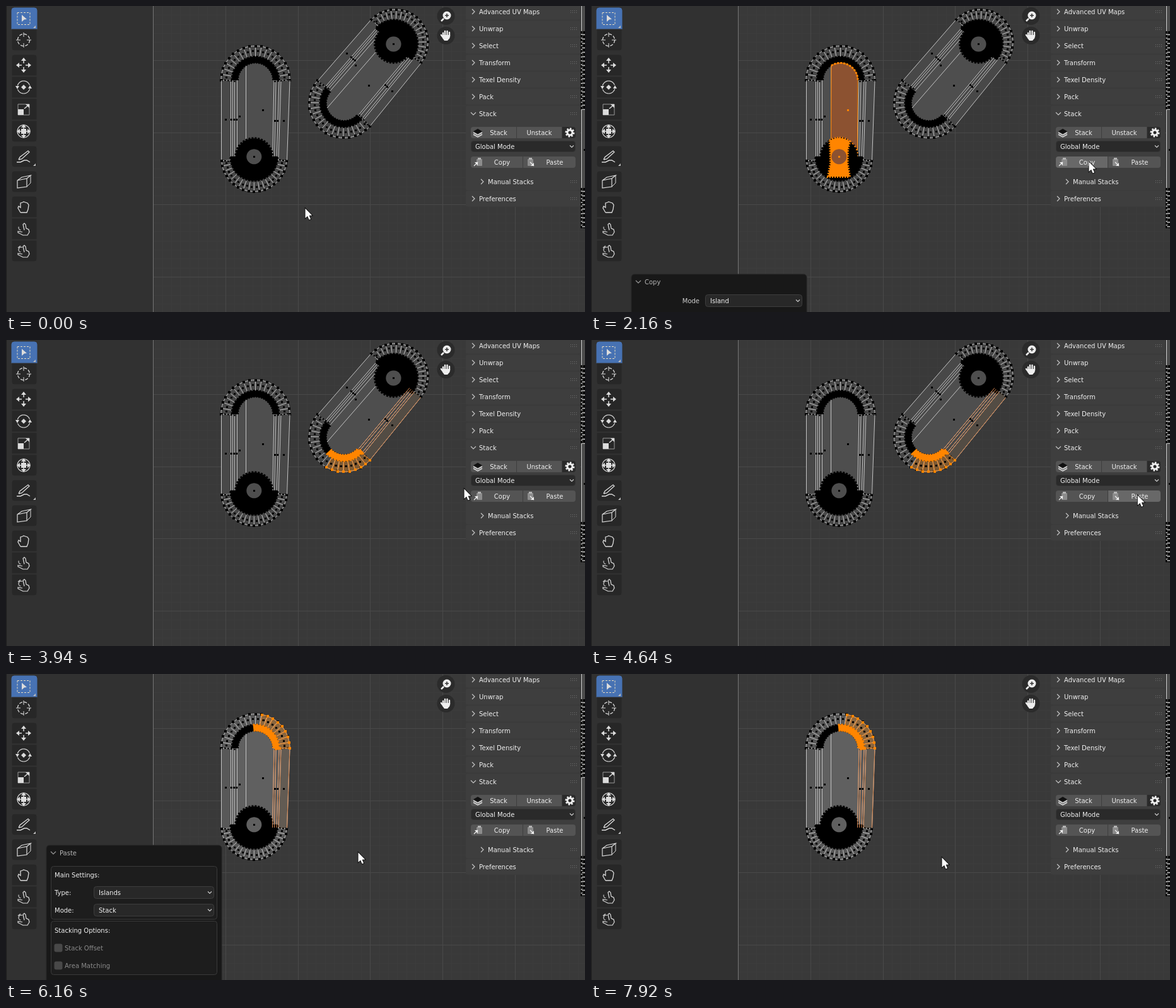
An HTML page with a canvas for the animation above (7990 ms loop, 918 by 486 pixels).

```html
<!DOCTYPE html>
<html lang="en">
<head>
<meta charset="utf-8">
<title>UV stack copy and paste</title>
<style>
html, body { margin: 0; width: 918px; height: 486px; overflow: hidden; background: #393939; }
canvas { display: block; }
</style>
</head>
<body>
<canvas id="stage" width="918" height="486"></canvas>
<script>
const g = document.getElementById('stage').getContext('2d');
const LOOP = 7990, ORANGE = '#ff8500', TAU = Math.PI * 2, RAD = Math.PI / 180;

// cursor tip: time, x, y
const PATH = [
  [0, 474, 321], [70, 474, 321], [420, 402, 232], [620, 398, 226], [830, 384, 288],
  [900, 382, 290], [970, 384, 291], [1120, 384, 291], [1170, 389, 290], [1500, 560, 277],
  [1940, 789, 247], [2490, 789, 247], [2800, 630, 270], [3050, 513, 190], [3240, 545, 150],
  [3380, 556, 162], [3600, 572, 185], [3940, 726, 236], [4080, 808, 244], [4500, 866, 246],
  [4920, 867, 247], [5060, 868, 248], [5320, 868, 248], [5780, 416, 274], [6160, 558, 283],
  [6380, 538, 285], [6640, 555, 284], [6840, 555, 284], [7190, 455, 288], [7590, 554, 286],
  [7920, 556, 291], [LOOP, 556, 291]
];
const EVENTS = { pick: 450, copyPress: 2020, copy: 2090, pickOther: 3380, pastePress: 4700, paste: 4780, grab: 6860, drop: 7700 };

function cursorAt(t) {
  let i = 1;
  while (i < PATH.length - 1 && PATH[i][0] < t) i++;
  const [t0, x0, y0] = PATH[i - 1], [t1, x1, y1] = PATH[i];
  const k = Math.min(1, (t - t0) / (t1 - t0)), e = k * k * (3 - 2 * k);
  return [x0 + (x1 - x0) * e, y0 + (y1 - y0) * e];
}

// ---- basic drawing ----
function trace(pts, close) {
  g.beginPath();
  pts.forEach(([x, y], i) => i ? g.lineTo(x, y) : g.moveTo(x, y));
  if (close) g.closePath();
}
function fill(pts, color) { trace(pts, true); g.fillStyle = color; g.fill(); }
function line(pts, color, width = 1, dash = []) {
  trace(pts);
  g.setLineDash(dash);
  g.strokeStyle = color;
  g.lineWidth = width;
  g.stroke();
  g.setLineDash([]);
}
function box(x, y, w, h, color, r = 0, border) {
  g.beginPath();
  g.roundRect(x, y, w, h, r);
  g.fillStyle = color;
  g.fill();
  if (border) { g.strokeStyle = border; g.lineWidth = 1; g.stroke(); }
}
function disc(x, y, r, color) {
  g.beginPath();
  g.arc(x, y, r, 0, TAU);
  g.fillStyle = color;
  g.fill();
}
function text(s, x, y, color = '#f0f0f0', align = 'left') {
  g.font = '10px "DejaVu Sans", sans-serif';
  g.textAlign = align;
  g.fillStyle = color;
  g.fillText(s, x, y + 4);
}
function chevron(x, y, down, color = '#c4c4c4', s = 4) {
  line(down ? [[x - s, y - s / 2], [x, y + s / 2], [x + s, y - s / 2]]
            : [[x - s / 2, y - s], [x + s / 2, y], [x - s / 2, y + s]], color, 1.2);
}
function arc(cx, cy, r, a0, a1, n = 40) {
  return Array.from({ length: n + 1 }, (_, i) => {
    const a = (a0 + (a1 - a0) * i / n) * RAD;
    return [cx + r * Math.cos(a), cy + r * Math.sin(a)];
  });
}

// ---- UV islands, all built in the space of the upright one ----
const TOP = [395.5, 118], LOW = [393.3, 243], HUB = [393.3, 239.3];
const LEFT = [341.5, 356.5, 359.5, 362.5, 366.5];
const RIGHT = [[450, 445.5], [436, 432], [433, 429], [428, 425.5], [425, 422.5]];
const MARKS = [[348, 180], [357, 180], [361, 180], [365, 180], [370, 175], [407, 165], [426, 182], [430, 182], [440, 182]];

const upright = p => p;
function tilted([x, y]) {
  const dx = (393 - x) * 1.01, dy = (y - 239) * 1.01, c = Math.cos(221 * RAD), s = Math.sin(221 * RAD);
  return [614 + dx * c - dy * s, 60.5 + dx * s + dy * c];
}

function pen(map) {
  const m = pts => pts.map(map);
  return {
    fill: (pts, c) => fill(m(pts), c),
    line: (pts, c, w, d) => line(m(pts), c, w, d),
    dots(pts, c, s = 3) {
      g.fillStyle = c;
      m(pts).forEach(([x, y]) => g.fillRect(Math.round(x - s / 2), Math.round(y - s / 2), s, s));
    }
  };
}

function ring(p, [cx, cy], r0, r1, a0, a1, n, lineColor, dotColor) {
  const inner = arc(cx, cy, r0, a0, a1, n), outer = arc(cx, cy, r1, a0, a1, n);
  const half = (a1 - a0) / n / 2;
  p.line(arc(cx, cy, r1, a0, a1), lineColor);
  inner.forEach((q, i) => p.line([q, outer[i]], lineColor));
  p.dots(arc(cx, cy, (r0 + r1) / 2, a0 + half, a1 - half, n - 1), '#000');
  p.dots(outer, dotColor, 4);
}
function band(p, [cx, cy], r0, r1, a0, a1, color) {
  p.fill([...arc(cx, cy, r0, a0, a1), ...arc(cx, cy, r1, a1, a0)], color);
  p.line(arc(cx, cy, r0, a0, a1), color, 2, [2, 2]);
  p.line(arc(cx, cy, r1, a0, a1), color, 3, [3, 2]);
}

function island(map, { face, stacked, quarter }) {
  const p = pen(map), body = stacked ? '#606060' : '#4e4e4e', wire = '#c4c4c4';
  p.fill([...arc(...TOP, 54.5, 180, 360), ...arc(...LOW, 52, 3, 177)], stacked ? '#585858' : '#484848');
  p.fill([...arc(...TOP, 29, 180, 360), [422, 243], [366, 243]], body);
  ring(p, TOP, 38, 54.5, 180, 360, 18, wire, '#000');
  ring(p, LOW, 37, 51.5, 3, 177, 18, wire, '#000');
  LEFT.forEach(x => p.line([[x, 118], [x, 245]], wire));
  RIGHT.forEach(([a, b]) => p.line([[a, 118], [b, 245]], wire));
  p.line([[380.5, 93], [380.5, 215]], wire);
  p.line([[341, 117], [366, 120]], '#000', 2, [3, 2]);
  p.line([[425, 120], [450, 117]], '#000', 2, [3, 2]);
  p.line([[341, 245], [364, 248]], '#000', 2, [3, 2]);
  p.line([[423, 243], [446, 246]], '#000', 2, [3, 2]);
  band(p, TOP, 27.5, 37.5, 180, 360, '#000');

  if (face) {
    const shape = [...arc(...TOP, 27.5, 238, 358), [422.5, 242], [380.5, 242]];
    p.fill(shape, '#8c5231');
    p.line([...shape, shape[0]], ORANGE);
    p.line(arc(...TOP, 27.5, 238, 358), ORANGE, 3, [3, 2]);
  }
  p.fill(arc(...HUB, 29, 0, 360, 60), '#000');
  p.line(arc(...HUB, 29.5, 0, 360, 60), '#000', 3, [3, 2]);
  p.fill(arc(393.3, 240, 37.5, -2, 182), '#000');
  p.line(arc(393.3, 240, 37.5, 0, 180), '#000', 3, [3, 2]);
  if (face) {
    const blob = [...arc(...HUB, 29.5, 240, 305, 12), [407, 228], [406.5, 250], [410, 271], [376, 271], [380, 250], [379.5, 228]];
    p.fill(blob, ORANGE);
    p.line([...blob, blob[0]], ORANGE, 4, [2, 2]);
    p.line(arc(...HUB, 30, 302, 350), ORANGE, 2, [2, 4]);
  }
  p.fill(arc(...HUB, 12, 0, 360), face ? '#8c5231' : body);
  p.dots(MARKS, '#000');
  p.dots([HUB], face ? ORANGE : '#000');
  if (face) p.dots([[407, 165]], ORANGE);
  if (quarter) selectedPart(map);
}

function selectedPart(map) {
  const p = pen(map);
  p.fill([...arc(...TOP, 38, -79, 0), ...arc(...TOP, 54, 0, -79)], 'rgba(255,133,0,.3)');
  p.fill([[436, 118], [450, 118], [445.5, 245], [432, 245]], 'rgba(255,133,0,.06)');
  RIGHT.forEach(([a, b]) => p.line([[a, 118], [b, 244]], '#d98850'));
  ring(p, TOP, 38, 54.5, -79, 0, 8, '#f08a2c', ORANGE);
  band(p, TOP, 27.5, 37.5, -96, 0, ORANGE);
  p.line([[426, 119], [436, 118]], ORANGE, 4);
  p.dots([[426, 182], [430, 182], [440, 182]], '#000');
}

// ---- editor background ----
function grid() {
  g.fillStyle = '#393939';
  g.fillRect(0, 0, 918, 486);
  const step = 114.7;
  const rules = (gap, n, color) => {
    g.fillStyle = color;
    for (let i = 0; i < n; i++) {
      g.fillRect(Math.round(233.3 + i * gap), 0, 1, 486);
      g.fillRect(234, Math.round(-28.8 + i * gap), 684, 1);
    }
  };
  rules(step / 8, 49, '#3c3c3c');
  rules(step, 6, '#494949');
  g.fillStyle = '#313131';
  g.fillRect(0, 0, 233, 486);
  g.fillStyle = '#1c1c1c';
  g.fillRect(0, 0, 1, 486);
  g.fillStyle = '#747474';
  g.fillRect(233, 0, 1, 486);
}

function edgeIsland() {
  g.fillStyle = '#4c4c4c';
  g.fillRect(913, 0, 5, 350);
  line([[912.5, 0], [912.5, 352]], '#cfcfcf');
  [[40, 166], [289, 353]].forEach(([a, b]) => {
    line([[912.5, a], [912.5, b]], '#000', 3, [4, 2]);
    line([[916.5, a], [916.5, b]], '#000', 3, [4, 3]);
    for (let y = a + 5; y < b; y += 7) line([[913, y + .5], [918, y + .5]], '#bbb');
  });
  g.fillStyle = '#000';
  g.fillRect(916, 227, 2, 3);
}

// ---- toolbar ----
function arrows(cx, cy, r0, r1, color) {
  for (let i = 0; i < 4; i++) {
    const c = [1, 0, -1, 0][i], s = [0, 1, 0, -1][i];
    const at = (u, v) => [cx + c * u - s * v, cy + s * u + c * v];
    line([at(r0, 0), at(r1 - 3, 0)], color, 1.5);
    fill([at(r1, 0), at(r1 - 5, -4), at(r1 - 5, 4)], color);
  }
}
function hand(x, y, c) {
  g.lineCap = 'round';
  [[-5, -3], [-2, -6], [1.5, -6], [5, -4]].forEach(([dx, dy]) => line([[x + dx, y + 2], [x + dx, y + dy]], c, 2.4));
  line([[x - 5, y + 4], [x - 8, y]], c, 2.4);
  g.lineCap = 'butt';
  fill([[x - 6, y], [x + 6.2, y], [x + 5.5, y + 5], [x + 2, y + 9], [x - 3, y + 9], [x - 6, y + 5]], c);
}
function finger(x, y, c, swirl) {
  line([[x + 1, y + 2], [x - 1, y - 7], [x + 1, y - 9], [x + 3, y - 7], [x + 4, y - 1], [x + 8, y + 1], [x + 9, y + 5], [x + 6, y + 10], [x - 1, y + 10], [x - 9, y + 6], [x - 9, y + 4], [x - 2, y + 5]], c, 1.2);
  line(arc(x - 4, y - 2, 4, 100, swirl ? 300 : 200), c, 1.1);
  if (swirl) line([[x - 9, y - 5], [x - 5, y - 8]], c, 1.1);
}
const ICONS = [
  (x, y, c) => {
    line([[x - 10, y - 9.5], [x + 10, y - 9.5], [x + 10, y + 9.5], [x - 10, y + 9.5], [x - 10, y - 9.5]], '#e8dcc0', 1, [3, 2]);
    fill([[x - 3, y - 6], [x + 5, y + 1], [x + 1, y + 1.5], [x - 3, y + 5]], c);
  },
  (x, y, c) => {
    line(arc(x, y, 9.5, 0, 360), c, 1.3, [5, 2.5]);
    for (let i = 0; i < 4; i++) {
      const a = i * 90 * RAD, u = Math.cos(a), v = Math.sin(a);
      line([[x + u * 5, y + v * 5], [x + u * 12, y + v * 12]], c);
    }
  },
  (x, y, c) => arrows(x, y, 3, 12, c),
  (x, y, c) => {
    line(arc(x, y, 10, 195, 340), c, 1.2);
    line(arc(x, y, 10, 15, 160), c, 1.2);
    fill([[x - 13, y - 2], [x - 7, y - 2], [x - 10, y + 3]], c);
    fill([[x + 13, y + 2], [x + 7, y + 2], [x + 10, y - 3]], c);
    fill([[x, y - 4], [x + 4, y], [x, y + 4], [x - 4, y]], c);
  },
  (x, y, c) => {
    line([[x - 9, y - 8], [x + 9, y - 8], [x + 9, y + 9], [x - 9, y + 9], [x - 9, y - 8]], '#999');
    box(x - 9, y, 9, 9, c);
    line([[x + 1, y - 1], [x + 7, y - 6]], c, 1.5);
    fill([[x + 9, y - 8], [x + 3, y - 8], [x + 9, y - 2]], c);
  },
  (x, y, c) => {
    line(arc(x, y, 10, 0, 360), c, 1.2);
    arrows(x, y, 4, 11, c);
    box(x - 4, y - 4, 8, 8, c);
  },
  (x, y, c) => {
    line([[x - 8, y + 5], [x - 6, y + 1], [x + 7, y - 9], [x + 9, y - 7], [x - 3, y + 4], [x - 8, y + 5]], c, 1.3);
    line([[x - 11, y + 9], [x - 5, y + 9], [x + 1, y + 6], [x + 5, y + 6], [x + 10, y + 9]], c, 1.4);
  },
  (x, y, c) => {
    line([[x - 10, y - 2], [x + 5, y - 5], [x + 5, y + 8], [x - 10, y + 10], [x - 10, y - 2], [x - 3, y - 7], [x + 11, y - 10], [x + 5, y - 5]], c, 1.2);
    line([[x + 11, y - 10], [x + 11, y + 2], [x + 5, y + 8]], c);
  },
  (x, y, c) => line([[x - 5, y + 9], [x - 9, y + 2], [x - 8, y - 1], [x - 5, y + 1], [x - 5, y - 6], [x - 2, y - 7], [x, y - 8], [x + 3, y - 7], [x + 6, y - 6], [x + 8, y - 3], [x + 7, y + 4], [x + 5, y + 9], [x - 5, y + 9]], c, 1.3),
  (x, y, c) => finger(x, y, c, false),
  (x, y, c) => finger(x, y, c, true)
];
const TOOL_Y = [3, 37, 77, 112, 147, 182, 222, 262, 302, 337, 372];
const JOIN = [2, 1, 2, 0, 0, 1, 3, 3, 2, 0, 1]; // 2 rounds the top, 1 the bottom

function toolbar() {
  TOOL_Y.forEach((y, i) => {
    const t = JOIN[i] & 2 ? 4 : 0, b = JOIN[i] & 1 ? 4 : 0;
    box(9, y, 40, 34, i ? '#272727' : '#4772b3', [t, t, b, b], i ? '#323232' : '#4772b3');
    ICONS[i](28, y + 17, '#dcdcdc');
    if (i === 0 || i === 6) fill([[47, y + 28], [47, y + 32], [43, y + 32]], '#bdbdbd');
  });
}

function gizmos() {
  disc(697.5, 16, 14, '#2b2b2b');
  disc(697.5, 47, 14, '#2b2b2b');
  disc(699, 15, 6.5, '#eee');
  line([[694, 20], [690, 24]], '#eee', 2.5);
  line([[696, 15], [702, 15]], '#333', 1.5);
  line([[699, 12], [699, 18]], '#333', 1.5);
  hand(698, 46, '#eee');
}

// ---- side panel ----
function grip(y) {
  g.fillStyle = '#707070';
  for (let i = 0; i < 4; i++) [-2, 1].forEach(d => g.fillRect(895 + i * 3, y + d, 1, 1));
}
function header(label, y, open) {
  box(729, y - 12.5, 181, 25, '#3e3e3e', 3);
  chevron(741, y, open);
  text(label, 750, y);
  grip(y);
}
function clipboard(x, y, out) {
  box(x - 3, y - 5, 9, 11, '#8c8c8c', 1);
  box(x - 1, y - 7, 5, 3, '#b5b5b5');
  const e = out ? [x - 1, y] : [x + 7, y + 6], s = out ? [x - 7, y + 6] : [x + 1, y];
  line([s, e], '#eee', 1.3);
  const d = out ? -1 : 1;
  fill([e, [e[0] - 5, e[1]], [e[0], e[1] - 5 * d]], '#eee');
}
function select(x, y, w, h, label) {
  box(x + .5, y + .5, w - 1, h - 1, '#282828', 4, '#3d3d3d');
  text(label, x + 8, y + h / 2);
  chevron(x + w - 7, y + h / 2, true, '#ccc', 3);
}

function sidePanel(t, [cx, cy]) {
  g.fillStyle = '#3a3a3a';
  g.fillRect(729, 0, 181, 319);
  ['Advanced UV Maps', 'Unwrap', 'Select', 'Transform', 'Texel Density', 'Pack'].forEach((s, i) => header(s, 9 + 27 * i));
  box(729, 158.5, 181, 134, '#3e3e3e', 3);
  header('Stack', 171, true);
  header('Preferences', 306);

  const tone = (x0, x1, y0, press) =>
    t >= press && t < press + 80 ? '#4772b3' :
    cx >= x0 && cx < x1 && cy >= y0 && cy < y0 + 19 ? '#686868' : '#545454';
  box(737, 192, 72, 18, '#545454', [4, 0, 0, 4]);
  box(810, 192, 71, 18, '#545454');
  box(882, 192, 21, 18, '#2a2a2a', [0, 4, 4, 0]);
  text('Stack', 781, 201, undefined, 'center');
  text('Unstack', 845.5, 201, undefined, 'center');
  [0, 3].forEach(d => line([[741, 201 + d], [748, 205 + d], [755, 201 + d]], '#ddd', 1.5));
  fill([[741, 199], [748, 195], [755, 199], [748, 203]], '#111');
  line(arc(894, 201, 6, 0, 360), '#eee', 3, [2.4, 2.3]);
  line(arc(894, 201, 4, 0, 360), '#eee', 3);

  box(737.5, 214.5, 165, 17, '#2a2a2a', 4, '#333');
  text('Global Mode', 744, 223);
  chevron(897, 223, true, '#ccc', 3);

  box(737, 239, 82, 18, tone(737, 819, 239, EVENTS.copyPress), [4, 0, 0, 4]);
  box(820, 239, 83, 18, tone(820, 903, 239, EVENTS.pastePress), [0, 4, 4, 0]);
  clipboard(749, 248, true);
  clipboard(830, 248, false);
  text('Copy', 786.5, 248, undefined, 'center');
  text('Paste', 870, 248, undefined, 'center');

  chevron(755, 279, false);
  text('Manual Stacks', 764, 279);
  grip(279);
}

// ---- operator panels ----
function opPanel(label, y) {
  box(64, y, 278, 500 - y, '#181818', 5, '#252525');
  chevron(75, y + 12, true, '#999');
  text(label, 85, y + 12, '#b4b4b4');
}
function copyPanel() {
  opPanel('Copy', 426);
  text('Mode', 172, 468, '#d0d0d0', 'right');
  select(181, 458, 154, 20, 'Island');
}
function pastePanel() {
  opPanel('Paste', 272);
  box(71.5, 305.5, 263, 84, '#1d1d1d', 4, '#3a3a3a');
  box(71.5, 392.5, 263, 85, '#1d1d1d', 4, '#3a3a3a');
  text('Main Settings:', 77, 319);
  text('Type:', 77, 347);
  text('Mode:', 77, 375);
  select(139, 337, 191, 20, 'Islands');
  select(139, 365, 191, 20, 'Stack');
  text('Stacking Options:', 77, 407);
  [['Stack Offset', 435], ['Area Matching', 463]].forEach(([s, y]) => {
    box(76.5, y - 6.5, 13, 13, '#484848', 3);
    text(s, 93, y, '#8a8a8a');
  });
}

function pointer([x, y]) {
  const shape = [[0, 0], [0, 15.5], [3.6, 12.2], [6, 18], [8.6, 17], [6.2, 11.3], [10.8, 11]].map(([a, b]) => [x + a + .5, y + b + .5]);
  trace(shape, true);
  g.strokeStyle = '#000';
  g.lineWidth = 1.6;
  g.stroke();
  fill(shape, '#fff');
}

function draw(t) {
  const tip = cursorAt(t), E = EVENTS;
  const pasted = t >= E.paste, other = t >= E.pickOther;
  const held = t >= E.grab && t < E.drop;
  grid();
  island(upright, { face: t >= E.pick && !other, stacked: pasted, quarter: pasted && !held });
  if (!pasted) island(tilted, { quarter: other });
  if (held) {
    const from = cursorAt(E.grab), dx = tip[0] - from[0], dy = tip[1] - from[1];
    selectedPart(([x, y]) => [x + dx, y + dy]);
  }
  edgeIsland();
  toolbar();
  gizmos();
  sidePanel(t, tip);
  if (t >= E.copy && !other) copyPanel();
  if (pasted && t < E.grab) pastePanel();
  pointer(tip);
}

const start = performance.now();
function tick(now) {
  draw(Math.max(0, now - start) % LOOP);
  requestAnimationFrame(tick);
}
draw(0);
requestAnimationFrame(tick);
</script>
</body>
</html>
```
